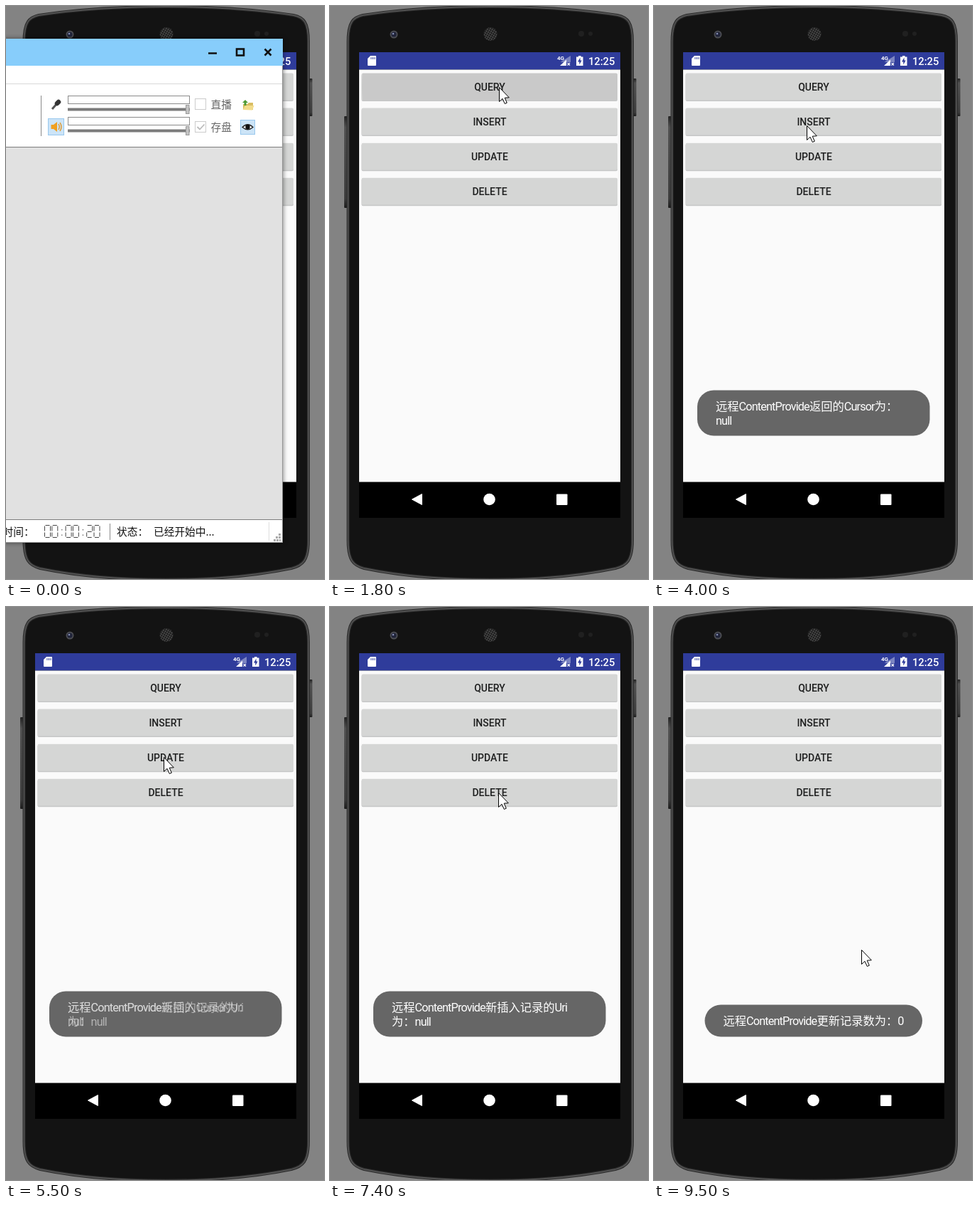
Write an HTML page that moves like this. It is 448 px wide and 806 px high and loops after 9.7 s.

```html
<!DOCTYPE html>
<html lang="zh-CN">
<head>
<meta charset="utf-8">
<title>ContentProvider demo</title>
<style>
  html, body { margin: 0; width: 100%; height: 100%; overflow: hidden; background: #838383; }
  svg { display: block; width: 448px; height: 806px; }
  text { white-space: pre; }
  .btn { font: 500 14px Roboto, sans-serif; fill: #1e1f1f; text-anchor: middle; }
  .clock { font: 500 14.7px Roboto, sans-serif; fill: #fff; }
  .net { font: 700 8px Roboto, sans-serif; fill: #fff; }
  .toast text { font: 16.3px "Noto Sans CJK SC", "Noto Sans CJK", sans-serif; fill: #fff; }
  .toast .en { font-family: Roboto, sans-serif; letter-spacing: -.88px; }
  .win text { font: 14.7px "Noto Sans CJK SC", "Noto Sans CJK", sans-serif; fill: #111; }
  .win .dim { fill: #666; }
  .win { transform-origin: 195px 755px; }
</style>
</head>
<body>
<svg viewBox="0 0 448 806" xmlns="http://www.w3.org/2000/svg">
  <defs>
    <pattern id="mesh" width="3" height="3" patternUnits="userSpaceOnUse" patternTransform="rotate(30)">
      <rect width="3" height="3" fill="#181818"/><circle cx="1.5" cy="1.5" r=".9" fill="#666"/>
    </pattern>
    <linearGradient id="side" x2="0" y2="1">
      <stop stop-color="#222"/><stop offset=".12" stop-color="#505050"/>
      <stop offset=".9" stop-color="#3c3c3c"/><stop offset="1" stop-color="#1c1c1c"/>
    </linearGradient>
    <path id="body" d="M25.500 50C25.500 22 33 16 46 13C150 -3 302 -3 405 13C419 16 426 22 426 50V752C426 780 418 787 402 791C300 812 150 812 48 791C33 787 25.500 780 25.500 752Z"/>
    <filter id="blur" x="-5%" y="-5%" width="110%" height="110%"><feGaussianBlur stdDeviation="3"/></filter>
  </defs>

  <!-- phone -->
  <rect width="448" height="806" fill="#838383"/>
  <rect x="20" y="155" width="5" height="129" rx="1" fill="url(#side)"/>
  <rect x="427" y="102" width="4.500" height="53" rx="1" fill="url(#side)"/>
  <use href="#body" fill="#131313" stroke="#2b2b2b" stroke-width="4"/>
  <use href="#body" fill="none" stroke="#515151" stroke-width="1.800"/>
  <circle cx="90" cy="40" r="5.500" fill="#4c4d52"/>
  <circle cx="90" cy="40" r="3.600" fill="#20243a"/>
  <circle cx="89" cy="39" r="1.300" fill="#8790b8"/>
  <circle cx="226" cy="39.500" r="9.500" fill="url(#mesh)"/>
  <g fill="#202020"><circle cx="354" cy="39" r="4"/><circle cx="367" cy="39" r="3"/></g>

  <!-- screen -->
  <rect x="41" y="65" width="368" height="655"/>
  <rect x="41" y="65" width="368" height="24.500" fill="#2f3c9b"/>
  <rect x="41" y="89.500" width="368" height="580" fill="#fafafa"/>
  <path d="M57 70H64Q65 70 65 71V83Q65 84 64 84H54Q53 84 53 83V74Z" fill="#fff"/>
  <path d="M58 72v3M60.500 72v3M63 72v3" stroke="#2f3c9b"/>
  <text class="net" x="320" y="76">4G</text>
  <path d="M339 70V79H324.500Z" fill="#7d86c2"/>
  <path d="M333 75.500V84H324Z" fill="#fff"/>
  <path d="M334.500 80l3.500 3.500m0-3.500l-3.500 3.500" stroke="#fff" stroke-width="1.200"/>
  <path d="M347 71.500H350V70H353.500V71.500H356.500V84H347Z" fill="#fff"/>
  <path d="M352.500 72.500L349 78.500H351.300V82.500L354.700 76.500H352.500Z" fill="#2f3c9b"/>
  <text class="clock" x="364" y="82.500">12:25</text>
  <g id="buttons"></g>
  <g fill="#fff">
    <path d="M115.500 694L129.500 686.500V701.500Z" stroke="#fff" stroke-linejoin="round"/>
    <circle cx="224.500" cy="694" r="8.300"/>
    <rect x="319" y="686.500" width="15.500" height="15.500" rx="1"/>
  </g>

  <g class="toast" id="wide">
    <rect x="61" y="540.500" width="327.500" height="64" rx="23" fill="#666"/>
    <g id="queryMsg">
      <text x="87" y="569">远程<tspan class="en">ContentProvide</tspan>返回的<tspan class="en">Cursor</tspan>为：</text>
      <text x="87" y="588.500" class="en">null</text>
    </g>
    <g id="insertMsg">
      <text x="87" y="569">远程<tspan class="en">ContentProvide</tspan>新插入记录的<tspan class="en">Uri</tspan></text>
      <text x="87" y="588.500">为：<tspan class="en">null</tspan></text>
    </g>
  </g>
  <g class="toast" id="narrow">
    <rect x="71.500" y="559.500" width="306.500" height="45" rx="22.500" fill="#666"/>
    <text x="97.500" y="588">远程<tspan class="en">ContentProvide</tspan>更新记录数为：<tspan class="en">0</tspan></text>
  </g>

  <!-- recorder window -->
  <g class="win" id="win">
    <rect x="-6" y="46" width="396.500" height="709" opacity=".5" filter="url(#blur)"/>
    <rect y="46" width="390" height="709" fill="#fff"/>
    <rect y="46" width="390" height="38" fill="#87cdfb"/>
    <g fill="none" stroke="#111" stroke-width="2.600">
      <path d="M285 66.500H297M364.500 60.500l9 9m0-9l-9 9"/><rect x="325" y="60.500" width="10" height="9"/>
    </g>
    <path d="M0 109.500H390" stroke="#d8d8d8"/>
    <path d="M49.500 126V183M146.500 728V751" stroke="#8a8a8a"/>
    <rect y="198" width="390" height="525" fill="#7c7c7c"/>
    <rect y="199" width="389.500" height="523" fill="#e1e1e1"/>
    <path d="M389.500 84V755M0 754.500H390" stroke="#999"/>

    <path d="M65 145L72 137" stroke="#555" stroke-width="3"/>
    <path d="M72 137l2-2" stroke="#333" stroke-width="6.500" stroke-linecap="round"/>
    <g id="sliders"></g>
    <g fill="#cce4f7" stroke="#99c8ee">
      <rect x="59.500" y="158.500" width="22" height="23"/><rect x="330.500" y="160.500" width="20" height="20"/>
    </g>
    <path d="M63.500 167H67L72 163V177L67 173H63.500Z" fill="#f0a020"/>
    <path d="M74 166q2.500 4 0 8M76 164q4 6 0 12" fill="none" stroke="#e58f12" stroke-width="1.300"/>
    <path d="M333 170.500Q340.500 163 348 170.500Q340.500 177 333 170.500Z" fill="#fff" stroke="#222" stroke-width="1.300"/>
    <circle cx="340.500" cy="170" r="3.200" fill="#111"/>
    <path d="M334 138H340L342 136H348V146H334Z" fill="#d9bd62"/>
    <path d="M333.500 146L337 140H349.500L347 146.500Z" fill="#f2dc8c"/>
    <path d="M337 132l4 4h-2.500v4h-3v-4H333Z" fill="#4d9a35"/>
    <g fill="#fff" stroke="#ccc">
      <rect x="266.500" y="130.500" width="15" height="15"/><rect x="266.500" y="162.500" width="15" height="15"/>
      <path d="M269.500 170l3.500 3.500 6.500-7" fill="none" stroke="#bbb" stroke-width="1.800"/>
    </g>
    <text class="dim" x="288.500" y="144">直播</text>
    <text class="dim" x="288.500" y="176">存盘</text>

    <text x="-4.500" y="745">时间：</text>
    <path id="timer" fill="none" stroke="#444"/>
    <text x="156" y="745">状态：</text>
    <text x="208" y="745">已经开始中...</text>
    <path d="M370.500 726V752" stroke="#ddd"/>
    <path d="M384 743.500h3M380 747.500h7M377 751.500h10" stroke="#aaa" stroke-width="3" stroke-dasharray="3 1"/>
  </g>

  <path id="cursor" d="M.5 .5V20.500L5 16.300L8.300 23.500L11.300 22.200L8.200 15.200L14.300 14.800Z" fill="#fff" stroke="#000"/>
</svg>

<script>
const LOOP = 9700, STEP = 100;
const $ = id => document.getElementById(id);
const clamp = v => Math.max(0, Math.min(1, v));

// label, press time, press x, ripple length
const buttons = [
  ['QUERY', 1500, 240, 700],
  ['INSERT', 2400, 222, 300],
  ['UPDATE', 5800, 222, 700],
  ['DELETE', 6900, 270, 300]
];
$('buttons').innerHTML = buttons.map(([label, , x], i) => {
  const y = 94.5 + i * 49.1;
  const box = `x="44.500" width="360.500" height="38" rx="2"`;
  return `<clipPath id="clip${i}"><rect ${box} y="${y}"/></clipPath>
    <rect ${box} y="${y + 1.5}" fill="#c6c7c7"/><rect ${box} y="${y}" fill="#d5d6d5"/>
    <circle id="ripple${i}" cx="${x}" cy="${y + 19}" clip-path="url(#clip${i})"/>
    <text class="btn" x="225" y="${y + 24.5}">${label}</text>`;
}).join('');

$('sliders').innerHTML = [126.5, 156.5].map(y => `
  <rect x="87.500" y="${y}" width="171" height="11" fill="#fff" stroke="#8a8a8a"/>
  <path d="M87 ${y + 19}H259" stroke="#7b7b7b" stroke-width="4"/>
  <rect x="253.500" y="${y + 13}" width="4.500" height="12" fill="#c4c4c4" stroke="#999"/>`).join('');

// seven-segment timer
const segments = ['m1 0h6', 'm8 1v7', 'm8 10v6', 'm1 17h6', 'm0 10v6', 'm0 1v7', 'm1 9h6'];
const digits = { 0: [0, 1, 2, 3, 4, 5], 2: [0, 1, 6, 4, 3] };
$('timer').setAttribute('d', [...'000020'].map((d, i) => {
  const x = 54.5 + i * 10.3 + (i >> 1) * 9;
  const colon = i % 2 && i < 5 ? `M${x + 14} 736v1.500m0 6v1.500` : '';
  return digits[d].map(s => `M${x} 730.500${segments[s]}`).join('') + colon;
}).join(''));

// time, x, y of the pointer tip
const path = [
  [100, 300, 420], [400, 320, 349], [500, 320, 349], [700, 305, 270], [1000, 262, 150],
  [1200, 240, 112], [1800, 238, 114], [2000, 235, 147], [2200, 231, 167], [2500, 216, 164],
  [3800, 216, 164], [4000, 215, 168], [4100, 215, 168], [4800, 222, 211], [6300, 222, 211],
  [6400, 222, 245], [6500, 218, 255], [6800, 217, 255], [7100, 245, 276], [7200, 247, 273],
  [7300, 247, 273], [7500, 226, 248], [7600, 226, 248], [7800, 350, 612], [8000, 391, 547],
  [8100, 391, 547], [8200, 433, 547], [8300, 428, 541], [8500, 292, 482], [LOOP, 292, 482]
];
function pointer(t) {
  const i = path.findIndex(p => p[0] >= t);
  if (i < 1) return path[0].slice(1);
  const [a, b] = [path[i - 1], path[i]];
  const k = (t - a[0]) / (b[0] - a[0]);
  return [1, 2].map(n => Math.round(a[n] + (b[n] - a[n]) * k));
}

const fade = (id, v) => $(id).setAttribute('opacity', v);

function draw(t) {
  fade('win', t < 300 ? 1 - t / 260 : 0);
  $('win').style.transform = `scale(${1 - Math.min(t, 300) / 1000})`;

  const [x, y] = pointer(t);
  $('cursor').setAttribute('transform', `translate(${x} ${y})`);
  fade('cursor', t < 100 ? 0 : 1);

  buttons.forEach(([, start, , length], i) => {
    const age = t - start, on = age >= 0 && age < length;
    $('ripple' + i).setAttribute('r', on ? 30 + age * .55 : 0);
    fade('ripple' + i, on ? .1 * (1 - age / length) : 0);
  });

  const swap = clamp((t - 5400) / 200);
  const last = clamp((t - 8900) / 500);
  fade('wide', clamp((t - 1900) / 390) * (1 - last));
  fade('queryMsg', 1 - swap);
  fade('insertMsg', swap);
  fade('narrow', last);
}

function tick() {
  const t = performance.now() % LOOP;
  draw(Math.floor(t / STEP) * STEP);
  requestAnimationFrame(tick);
}
tick();
</script>
</body>
</html>
```
